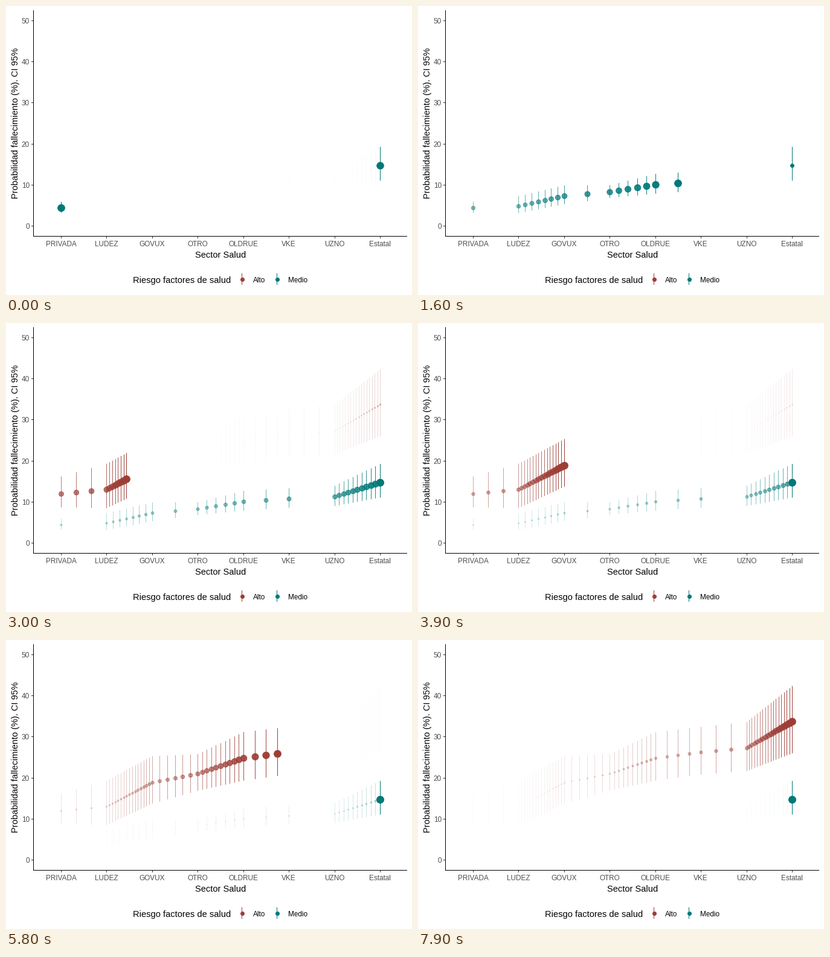
Recreate the animation shown at these times as a matplotlib script. Size 672 px wide and 480 px high, loop 10 s.

```python
import matplotlib.pyplot as plt
import numpy as np
from matplotlib.animation import FuncAnimation
from matplotlib.collections import LineCollection
from matplotlib.colors import to_rgb

W, H, DPI = 672, 480, 96
PX = 72 / DPI                      # one pixel in points
STEPS, FRAMES = 80, 100            # moving frames, then a pause to fill the loop
HIGH, MEDIUM, GREY = "#9C3E36", "#007878", "#4D4D4D"
ODDS_RATIO, RATIO_SPREAD = 2.95, 0.175

# Medium-risk probability (%) and half-width of its interval on the logit scale
SECTORS = {
    "PRIVADA": (4.4, 0.31), "LUDEZ": (4.82, 0.44), "GOVUX": (7.3, 0.335),
    "OTRO": (8.26, 0.205), "OLDRUE": (10.05, 0.265), "VKE": (10.75, 0.245),
    "UZNO": (11.255, 0.247), "Estatal": (14.7, 0.325),
}
SECTOR_X = 91 + 75.43 * np.arange(len(SECTORS))


def percent(logit):
    return 100 / (1 + np.exp(-logit))


def y_pixel(value):
    return 365.5 - 6.82 * value


estimate, spread = np.array(list(SECTORS.values())).T
logit = np.log(estimate / (100 - estimate))
MODELS = {
    MEDIUM: (logit, spread),
    HIGH: (logit + np.log(ODDS_RATIO), np.hypot(spread, RATIO_SPREAD)),
}
LOWEST, HIGHEST = percent(logit[0]), percent(MODELS[HIGH][0][-1])


def build_path(center, half_width):
    """Each sector is reached when the rising probability gets to its estimate."""
    value = percent(center)
    arrival = np.round((value - LOWEST) / (HIGHEST - LOWEST) * (STEPS - 1))
    step = np.arange(STEPS)
    rows = [SECTOR_X] + [y_pixel(percent(center + k * half_width)) for k in (0, 1, -1)]
    return arrival[0], np.array([np.interp(step, arrival, row) for row in rows]).T


PATHS = {color: build_path(*model) for color, model in MODELS.items()}

plt.rcParams["font.family"] = "Liberation Sans"
fig = plt.figure(figsize=(W / DPI, H / DPI), dpi=DPI, facecolor="white")
ax = fig.add_axes([0, 0, 1, 1])
ax.set(xlim=(0, W), ylim=(H, 0))
ax.axis("off")


def label(x, y, text, size=8.8, color="black", ha="center", rotation=0):
    ax.text(x, y, text, size=size, color=color, ha=ha, va="baseline",
            rotation=rotation, rotation_mode="anchor")


def line(x0, y0, x1, y1, color="black"):
    ax.plot([x0, x1], [y0, y1], color=color, lw=PX, solid_capstyle="butt", snap=False)


def marker_area(strength):
    return ((11.4 * strength + 0.3) * PX) ** 2


def draw_axes():
    for value in range(0, 51, 10):
        y = int(y_pixel(value)) + 0.5
        line(42, y, 45, y, "#333333")
        label(39, y + 4.2, str(value), color=GREY, ha="right")
    for x, name in zip(SECTOR_X, SECTORS):
        column = round(x) + 0.5
        line(column, 383, column, 386, "#333333")
        label(x, 399, name, color=GREY)
    line(45.5, 7, 45.5, 383)
    line(45, 382.5, 664, 382.5)
    label(355, 418, "Sector Salud", 11)
    label(20, 194.5, "Probabilidad fallecimiento (%). CI 95%", 11, rotation=90)


def draw_legend():
    label(210, 460, "Riesgo factores de salud", 11, ha="left")
    for x, color, name in [(390.5, HIGH, "Alto"), (448.5, MEDIUM, "Medio")]:
        line(x, 444, x, 463, color)
        ax.scatter(x, 453.5, s=marker_area(0.5), color=color, lw=PX, zorder=3, snap=False)
        label(x + 18.5, 459, name, ha="left")


draw_axes()
draw_legend()
ranges = LineCollection([], linewidths=PX, zorder=4, snap=False)
ax.add_collection(ranges)
dots = ax.scatter([], [], lw=PX, zorder=5, snap=False)


def update(frame):
    now = min(frame, STEPS - 1)
    segments, centers, areas, colors = [], [], [], []
    # Cubic wake over one whole cycle, oldest copies underneath
    for age in range(STEPS - 1, -1, -1):
        step = (now - age) % STEPS
        strength = (1 - age / STEPS) ** 3
        for color, (start, path) in PATHS.items():
            if min(now, step) < start:
                continue
            x, mid, top, bottom = path[step]
            column = round(x) + 0.5
            segments.append([(column, top), (column, bottom)])
            centers.append((column, mid))
            areas.append(marker_area(strength))
            colors.append((*to_rgb(color), strength))
    ranges.set_segments(segments)
    ranges.set_color(colors)
    dots.set_offsets(centers)
    dots.set_sizes(areas)
    dots.set_facecolor(colors)
    dots.set_edgecolor(colors)
    return ranges, dots


animation = FuncAnimation(fig, update, frames=FRAMES, interval=100, repeat=True)
plt.show()
```
